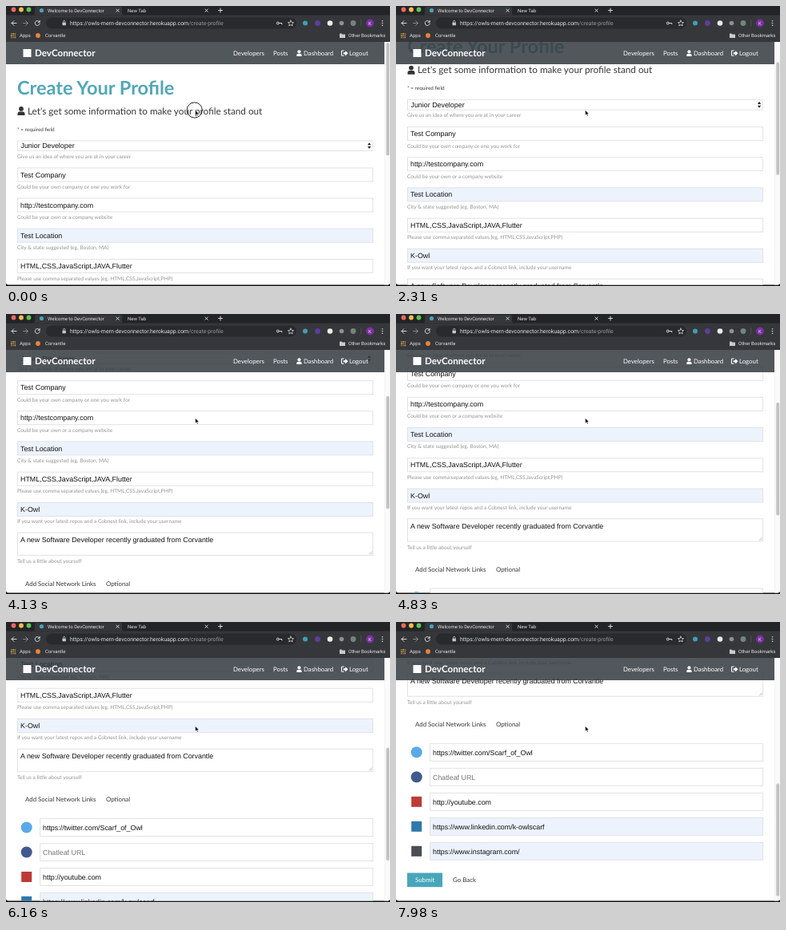
An HTML page for the animation above (8000 ms loop, 480x351 px).

```html
<!DOCTYPE html>
<html lang="en">
<head>
<meta charset="utf-8">
<title>Create profile</title>
<style>
  html, body { margin: 0; width: 100%; height: 100%; overflow: hidden; background: #101113; }
  svg { display: block; width: 100vw; height: 100vh; }
  text { white-space: pre; text-rendering: geometricPrecision; }
  .lato { font-family: Lato, sans-serif; fill: #383838; }
  .field { font: 8.9px "Liberation Sans", Arial, sans-serif; fill: #111; }
  .help { font-size: 6.6px; fill: #939393; }
  .btn { font-size: 7.9px; }
  .nav { font-size: 7.8px; fill: #fff; }
  .ui { font: 6px Roboto, sans-serif; fill: #e2e3e5; }
  .line { fill: none; stroke: #d5d6d8; stroke-width: 1; stroke-linecap: round; stroke-linejoin: round; }
</style>
</head>
<body>
<svg viewBox="0 0 480 351" preserveAspectRatio="none">
  <defs>
    <clipPath id="win"><path d="M0 0H480V346.5a3 3 0 0 1-3 3H3a3 3 0 0 1-3-3Z"/></clipPath>
    <g id="person">
      <circle cx="4.5" cy="2.9" r="2.9"/>
      <path d="M0 11V9.2Q0 6.4 2.6 6.4H6.4Q9 6.4 9 9.2V11Z"/>
    </g>
  </defs>

  <g clip-path="url(#win)">
    <rect width="480" height="351" fill="#fff"/>
    <g id="page"></g>

    <rect y="45" width="473" height="28" fill="#343a40" opacity=".85"/>
    <g class="lato nav">
      <rect x="21.5" y="54" width="10" height="10" fill="#fff"/>
      <text x="36" y="62.8" font-size="11.65" font-weight="700" fill="#fff">DevConnector</text>
      <g fill="#fff">
        <text x="284" y="62">Developers</text>
        <text x="334" y="62">Posts</text>
        <use href="#person" transform="translate(363.3 55.3) scale(.7)"/>
        <text x="372" y="62">Dashboard</text>
        <path d="M422.5 56h-2.2q-.8 0-.8.8v4.7q0 .8.8.8h2.2" fill="none" stroke="#fff" stroke-width="1.1"/>
        <path d="M421.8 58h2.4v-2l3.3 3.2-3.3 3.2v-2h-2.4z"/>
        <text x="429" y="62">Logout</text>
      </g>
    </g>

    <rect x="473" y="45" width="7" height="306" fill="#fafafa"/>
    <rect x="473" y="45" width=".5" height="306" fill="#ececec"/>
    <rect id="thumb" x="475.3" y="46" width="3.9" height="141.5" rx="1.9" fill="#c1c1c1"/>

    <g id="chrome">
      <rect width="480" height="45" fill="#36373b"/>
      <rect width="480" height="11.5" fill="#232428"/>
      <path d="M34 11.5q2 0 2-2V3q0-2 2-2H143q2 0 2 2V9.5q0 2 2 2Z" fill="#36373b"/>
      <circle cx="9.5" cy="4.5" r="2.9" fill="#ed6a5e"/>
      <circle cx="19" cy="4.5" r="2.9" fill="#f4bf4f"/>
      <circle cx="28.5" cy="4.5" r="2.9" fill="#61c554"/>
      <circle cx="44.5" cy="5.5" r="2.6" fill="#4aa3b5"/>
      <text class="ui" x="52" y="7.7">Welcome to DevConnector</text>
      <text class="ui" x="152" y="7.7">New Tab</text>
      <path class="line" d="M138 4l3.2 3.2m0-3.2l-3.2 3.2M249 4l3.2 3.2m0-3.2l-3.2 3.2M265.5 5.5h5M268 3v5"/>

      <rect x="50" y="14.5" width="313" height="14" rx="7" fill="#292a2e"/>
      <path class="line" d="M13 21.5H7m2.8-2.8L7 21.5l2.8 2.8"/>
      <path class="line" style="stroke:#85878a" d="M21.5 21.5h6m-2.8-2.8l2.8 2.8-2.8 2.8"/>
      <path class="line" d="M41.7 19.7a3 3 0 1 0 .5 2.3M42.2 18.3v2h-2"/>
      <rect x="70.5" y="20.7" width="4.4" height="3.6" rx=".5" fill="#c6c8ca"/>
      <path class="line" style="stroke-width:.8" d="M71.5 20.5v-1a1.2 1.2 0 0 1 2.4 0v1"/>
      <text class="ui" x="80" y="23.9" style="font-size:6.95px">https://owls-mern-devconnector.herokuapp.com<tspan fill="#96999d">/create-profile</tspan></text>
      <circle class="line" cx="339.8" cy="21.5" r="1.5"/>
      <path class="line" d="M341.5 21.5h3.3v1.3"/>
      <path class="line" style="stroke-width:.8" d="M356 18l1.1 2.4 2.5.3-1.9 1.7.5 2.5-2.2-1.3-2.2 1.3.5-2.5-1.9-1.7 2.5-.3z"/>
      <circle cx="374" cy="21.5" r="3" fill="#3f9fb4"/>
      <circle cx="389.5" cy="21.5" r="3.4" fill="#5b3f9c"/>
      <circle cx="405" cy="21.5" r="3.3" fill="#ececee"/>
      <circle cx="419.5" cy="21.5" r="2.8" fill="#8d9194"/>
      <circle cx="434" cy="21.5" r="3.4" fill="#71857c"/>
      <rect x="443.5" y="17.5" width=".7" height="8" fill="#5a5c60"/>
      <circle cx="455" cy="21.5" r="4.9" fill="#7d2fa6"/>
      <text class="ui" x="455" y="23.7" text-anchor="middle">K</text>
      <g fill="#d5d6d8">
        <circle cx="470.5" cy="18.8" r=".8"/><circle cx="470.5" cy="21.5" r=".8"/><circle cx="470.5" cy="24.2" r=".8"/>
      </g>

      <g id="apps"></g>
      <text class="ui" x="17" y="39.2">Apps</text>
      <circle cx="40" cy="37" r="2.9" fill="#e8843c"/>
      <text class="ui" x="49" y="39.2">Corvantle</text>
      <path d="M417 34.5h2.5l.9 1h3.6v4.5h-7z" fill="#c9cbcd"/>
      <text class="ui" x="428" y="39.2">Other Bookmarks</text>
    </g>
  </g>

  <circle id="ring" cx="235.7" cy="130.5" r="9.6" fill="none" stroke="#222"/>
  <path d="M236.6 130.5v6.4l1.5-1.3 1 2.3 1.1-.5-1-2.2h2z" fill="#000" stroke="#fff" stroke-width=".5"/>
</svg>

<script>
const $ = id => document.getElementById(id);
const text = (cls, x, y, s, extra = '') => `<text class="${cls}" x="${x}" y="${y}" ${extra}>${s}</text>`;
const box = (x, y, w, h, fill) =>
  `<rect x="${x}" y="${y}" width="${w}" height="${h}" fill="${fill}" stroke="#dedfe1" stroke-width=".9"/>`;
const help = (y, s) => text('lato help', 14, y + 2.3, s);
const WHITE = '#fff', FILLED = '#edf3fd';

// centre of the box, value, hint, background
const fields = [
  [211.5, 'Test Company', 'Could be your own company or one you work for', WHITE],
  [249.5, 'http://testcompany.com', 'Could be your own or a company website', WHITE],
  [287.7, 'Test Location', 'City &amp; state suggested (eg. Boston, MA)', FILLED],
  [326, 'HTML,CSS,JavaScript,JAVA,Flutter', 'Please use comma separated values (eg. HTML,CSS,JavaScript,PHP)', WHITE],
  [364.2, 'K-Owl', 'If you want your latest repos and a Cobnest link, include your username', FILLED]
];

// value, background, icon colour, corner radius of the icon
const links = [
  ['https://twitter.com/Scarf_of_Owl', WHITE, '#5aa9e6', 7],
  ['Chatleaf URL', WHITE, '#41598f', 7],
  ['http://youtube.com', WHITE, '#bd3b35', 0],
  ['https://www.linkedin.com/k-owlscarf', FILLED, '#2f78ad', 0],
  ['https://www.instagram.com/', FILLED, '#4a4d52', 0]
];

$('page').innerHTML = [
  text('lato', 14, 110.8, 'Create Your Profile', 'font-size="23.55" font-weight="700" style="fill:#52a7b8"'),
  '<use href="#person" x="14.5" y="126" fill="#333"/>',
  text('lato', 27, 135.8, "Let's get some information to make your profile stand out", 'font-size="11.73"'),
  text('lato', 14, 156.5, '* = required field', 'font-size="6.35"'),
  box(14.5, 169, 444.2, 12.5, WHITE),
  text('field', 18.5, 178.2, 'Junior Developer'),
  '<path d="M452 174.3l2.1-3.1 2.1 3.1zM452 176l2.1 3.1 2.1-3.1z" fill="#222"/>',
  help(188.2, 'Give us an idea of where you are at in your career'),
  ...fields.map(([y, value, hint, bg]) =>
    box(14.5, y - 8.5, 444.2, 17, bg) + text('field', 18, y + 3.1, value) + help(y + 15.2, hint)),
  box(14.5, 393.5, 444.2, 28.2, WHITE),
  text('field', 18, 405.7, 'A new Software Developer recently graduated from Corvantle'),
  '<path d="M454 420.5l3.7-3.7M456 420.5l1.7-1.7" stroke="#999" stroke-width=".6"/>',
  help(429, 'Tell us a little about yourself'),
  text('lato btn', 24, 459.8, 'Add Social Network Links'),
  text('lato btn', 125, 459.8, 'Optional'),
  ...links.map(([value, bg, color, r], i) => {
    const y = 491.8 + 31 * i, s = r ? 14 : 13;
    return `<rect x="${25.7 - s / 2}" y="${y - s / 2}" width="${s}" height="${s}" rx="${r}" fill="${color}"/>`
      + box(42.7, y - 11, 416, 22, bg)
      + text('field', 46, y + 3.2, value, i === 1 ? 'style="fill:#757575"' : '');
  }),
  '<rect x="14" y="643" width="44" height="17.7" fill="#48a6bb"/>',
  text('lato btn', 24, 654.7, 'Submit', 'style="fill:#fff"'),
  text('lato btn', 71, 654.7, 'Go Back')
].join('');

const dots = ['#d9574c', '#e0a33e', '#5fa85c'];
$('apps').innerHTML = Array.from({ length: 9 }, (_, i) => {
  const col = i % 3, row = Math.floor(i / 3);
  return `<rect x="${6 + col * 2.3}" y="${34 + row * 2.3}" width="1.6" height="1.6" fill="${dots[(col + row) % 3]}"/>`;
}).join('');

// scroll bursts: start, end, position reached
const LOOP = 8000, TICK = 70;
const bursts = [
  [770, 1610, 8], [1890, 2730, 62], [3010, 3570, 98], [3920, 4480, 131],
  [4760, 5460, 191], [5740, 6580, 245], [6790, 7350, 287], [7420, 7980, 328.5]
];

function scroller(el, rate) {
  let pos = 0;
  const at = (ms, y, easing = 'linear') =>
    ({ offset: ms / LOOP, transform: `translate(0px, ${y * rate}px)`, easing });
  const keys = [at(0, 0)];
  for (const [from, to, y] of bursts) {
    keys.push(at(from, pos, 'ease'), at(to, y));
    pos = y;
  }
  keys.push(at(LOOP, pos));
  return el.animate(keys, { duration: LOOP, fill: 'both' });
}

const anims = [
  scroller($('page'), -1),
  scroller($('thumb'), 0.476),
  $('ring').animate([
    { opacity: 1, offset: 0 },
    { opacity: 0, offset: 350 / LOOP },
    { opacity: 0, offset: 1 }
  ], { duration: LOOP, fill: 'both' })
];
anims.forEach(a => a.pause());

const start = performance.now();
function draw() {
  const t = (performance.now() - start) % LOOP;
  const step = Math.floor(t / TICK) * TICK;
  anims.forEach(a => a.currentTime = step);
  requestAnimationFrame(draw);
}
draw();
</script>
</body>
</html>
```
